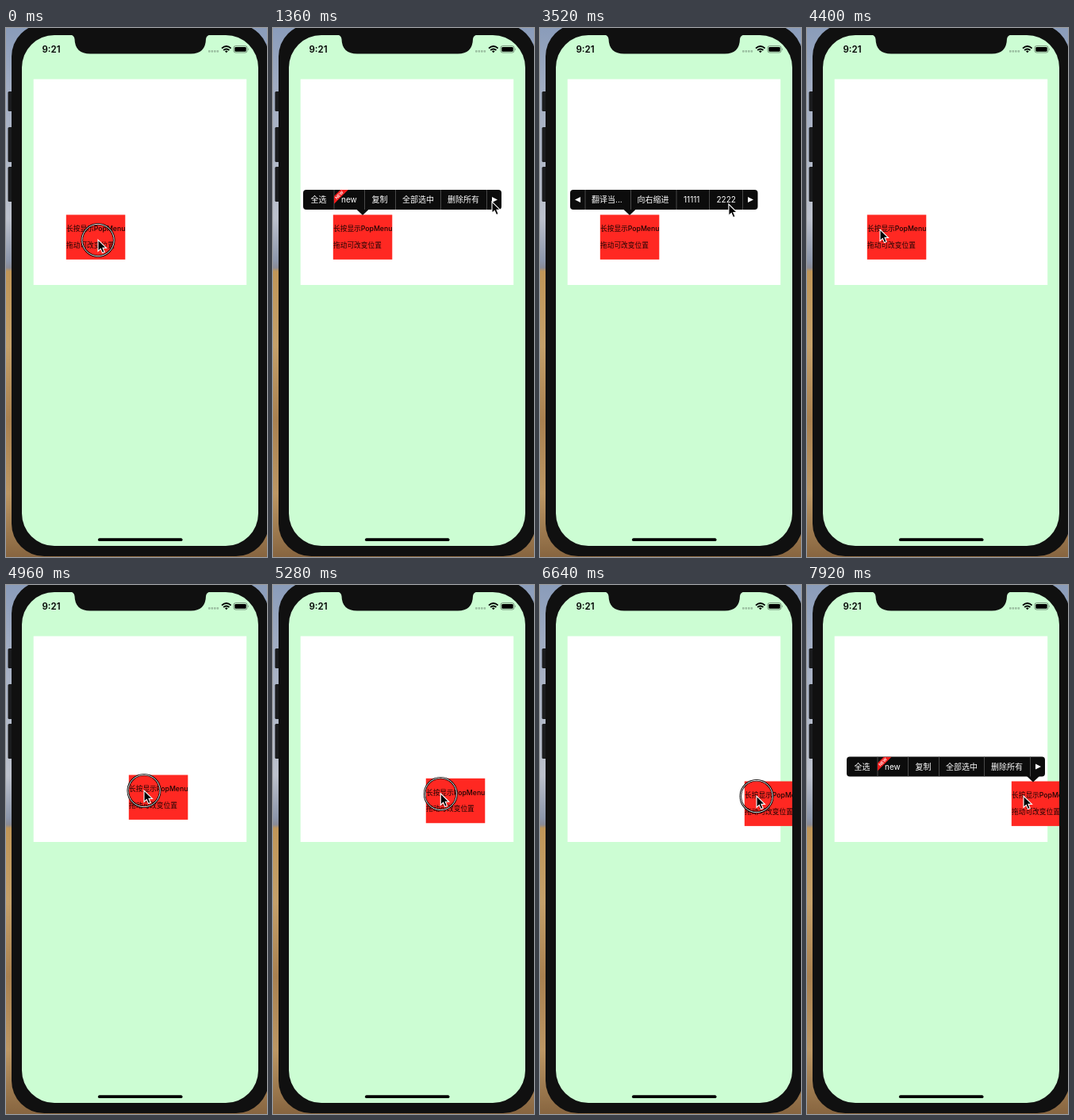
These frames come from a looping animation (329x667 px, 8000 ms). An HTML page:

```html
<!DOCTYPE html>
<html lang="zh">
<head>
<meta charset="utf-8">
<title>PopMenu</title>
<style>
html, body { margin: 0; width: 100%; height: 100%; overflow: hidden; background: #a9b5c8; }
svg { display: block; width: 329px; height: 667px; }
text { font-family: Inter, "Noto Sans CJK SC", "Noto Sans CJK", sans-serif; }
.menu text { font-size: 10px; fill: #fff; }
.label { font-size: 8.7px; font-weight: 500; fill: #1c0403; }
</style>
</head>
<body>
<svg viewBox="0 0 329 667">
  <defs>
    <linearGradient id="desk" x2="0" y2="1">
      <stop offset="0" stop-color="#8a9cba"/>
      <stop offset=".12" stop-color="#a2adc2"/>
      <stop offset=".36" stop-color="#bcc1cc"/>
      <stop offset=".44" stop-color="#8d97ab"/>
      <stop offset=".453" stop-color="#8a8c98"/>
      <stop offset=".46" stop-color="#c09658"/>
      <stop offset=".6" stop-color="#c4a06a"/>
      <stop offset=".74" stop-color="#a98150"/>
      <stop offset=".88" stop-color="#bc9764"/>
      <stop offset="1" stop-color="#876540"/>
    </linearGradient>
    <clipPath id="screen"><rect x="20" y="9" width="298" height="644" rx="41"/></clipPath>
    <clipPath id="corner"><path d="M0 0H18L0 18Z"/></clipPath>
  </defs>

  <rect width="329" height="667" fill="url(#desk)"/>
  <g fill="#1b1c1e">
    <rect x="2.5" y="80" width="6" height="25" rx="1.5"/>
    <rect x="2.5" y="125" width="6" height="44" rx="1.5"/>
    <rect x="2.5" y="175" width="6" height="44" rx="1.5"/>
  </g>
  <rect x="7" y="-5" width="324" height="671" rx="41" fill="#101010"/>

  <g clip-path="url(#screen)">
    <rect x="20" y="9" width="298" height="644" fill="#ccfdd3"/>
    <rect x="34.7" y="64.5" width="268.5" height="259.5" fill="#fff"/>
    <g id="box">
      <rect x="-.2" y="-.5" width="74.5" height="56.4" fill="#ff2822"/>
      <g class="label">
        <text y="20.4">长按显示PopMenu</text>
        <text y="40.6">拖动可改变位置</text>
      </g>
    </g>
    <g id="menus"></g>
    <text x="45.5" y="31" font-size="11.5" font-weight="600" fill="#000">9:21</text>
    <g fill="#9bbfa1">
      <rect x="255" y="28" width="2.6" height="2.8" rx=".8"/>
      <rect x="258.5" y="28" width="2.6" height="2.8" rx=".8"/>
      <rect x="262" y="28" width="2.6" height="2.8" rx=".8"/>
      <rect x="265.5" y="28" width="2.6" height="2.8" rx=".8"/>
    </g>
    <g fill="none" stroke="#000" stroke-width="1.9">
      <path d="M272 25.6Q277.8 20.4 283.6 25.6"/>
      <path d="M274.2 28Q277.8 24.8 281.4 28"/>
    </g>
    <path d="M275.9 29.3Q277.8 27.8 279.7 29.3L277.8 31.3Z"/>
    <rect x="287" y="22.6" width="17" height="8.4" rx="2.4" fill="none" stroke="#5f7562" stroke-width=".8"/>
    <rect x="288.3" y="23.9" width="14.4" height="5.8" rx="1.3"/>
    <path d="M305 25.2Q306.4 26.8 305 28.4Z" fill="#5f7562"/>
    <rect x="116" y="643.3" width="106.5" height="3.8" rx="1.9"/>
  </g>
  <path fill="#101010" d="M80 8Q86 9 86.5 14Q87 32.5 106 32.5H233Q251.5 32.5 252 14Q252.5 9 258.5 8Z"/>

  <g id="ring" fill="none">
    <circle r="20.2" stroke="#000" stroke-width="2.6"/>
    <circle r="20.2" stroke="#fff" stroke-width=".9"/>
  </g>
  <path id="cursor" d="M0 0V14.5L3.3 11.4L5.6 16.6L8.2 15.5L6 10.4H10.5Z" fill="#000" stroke="#fff" stroke-width="1.1"/>
</svg>
<script>
const LOOP = 8000, STEP = 80;
const $ = id => document.getElementById(id);

// Each item: text and its left edge; L and R are page arrows.
const pages = [
  { width: 250, lines: [39, 77.5, 116.5, 173.5, 231.5], badge: 39,
    items: [["全选", 9.5], ["new", 48], ["复制", 86.5], ["全部选中", 125], ["删除所有", 182], ["R", 238]] },
  { width: 236.5, lines: [19, 76.5, 134, 175.5, 217.5],
    items: [["L", 6], ["翻译当...", 27], ["向右缩进", 84.5], ["11111", 143], ["2222", 184.5], ["R", 224]] }
];

function itemSvg([name, x]) {
  if (name === "R") return `<path d="M${x} 9V16L${x + 7} 12.5Z" fill="#fff"/>`;
  if (name === "L") return `<path d="M${x + 7} 9V16L${x} 12.5Z" fill="#fff"/>`;
  return `<text x="${x}" y="16.1">${name}</text>`;
}

function badgeSvg(x) {
  return `<g transform="translate(${x} 0)" clip-path="url(#corner)">
    <path d="M0 8L8 0H18L0 18Z" fill="#f01c1c"/>
    <text transform="translate(6.5 6.5) rotate(-45)" y="2" text-anchor="middle" style="font-size:5.2px;font-weight:600">NEW</text></g>`;
}

$("menus").innerHTML = pages.map(p => `<g class="menu">
  <rect width="${p.width}" height="25" rx="4" fill="#0c0c0c"/>
  <path class="tail" d="M-8 24.5H8L0 32Z" fill="#0c0c0c"/>
  ${p.lines.map(x => `<path d="M${x} 0V25" stroke="#5a5a5a" stroke-width=".8"/>`).join("")}
  ${p.badge ? badgeSvg(p.badge) : ""}
  ${p.items.map(itemSvg).join("")}</g>`).join("");
const menus = [...document.querySelectorAll(".menu")];

// Tracks: time, x, y
const cursorTrack = [
  [0, 116, 267], [640, 116, 267], [1280, 276, 219], [1920, 276, 219],
  [2400, 266, 216], [3360, 266, 216], [4160, 92, 254], [4560, 92, 254],
  [4960, 174, 259], [5680, 260, 268], [6240, 273, 266], [LOOP, 273, 266]
];
const boxTrack = [
  [0, 76, 236], [4560, 76, 236], [4960, 155, 240],
  [5680, 242.6, 250], [6240, 258, 248], [LOOP, 258, 248]
];
const presses = [[0, 560], [1520, 1680], [4480, 7040]];
const shows = [
  { page: 0, from: 480, to: 1600, x: 38, y: 204, tail: 75 },
  { page: 1, from: 1600, to: 3600, x: 38, y: 204, tail: 75 },
  { page: 0, from: 6960, to: LOOP, x: 50, y: 216.5, tail: 235 }
];

function at(track, t) {
  const i = track.findIndex(k => k[0] > t);
  const [t0, x0, y0] = track[i - 1], [t1, x1, y1] = track[i];
  const p = (t - t0) / (t1 - t0);
  const e = p * p * (3 - 2 * p) * .4 + p * .6;
  return [x0 + (x1 - x0) * e, y0 + (y1 - y0) * e];
}

function place(el, [x, y]) {
  el.setAttribute("transform", `translate(${x} ${y})`);
}

function draw(t) {
  const pos = at(cursorTrack, t);
  const down = presses.some(([a, b]) => t >= a && t < b);
  place($("cursor"), pos);
  place($("ring"), [pos[0], pos[1] + .5]);
  place($("box"), at(boxTrack, t));
  $("ring").style.display = down ? "" : "none";

  const show = shows.find(s => t >= s.from && t < s.to);
  menus.forEach((m, i) => {
    const on = show && show.page === i;
    m.style.display = on ? "" : "none";
    if (!on) return;
    place(m, [show.x, show.y]);
    place(m.querySelector(".tail"), [show.tail, 0]);
  });
}

const start = performance.now();
function tick() {
  const t = (performance.now() - start) % LOOP;
  draw(Math.floor(t / STEP) * STEP);
  requestAnimationFrame(tick);
}
tick();
</script>
</body>
</html>
```
